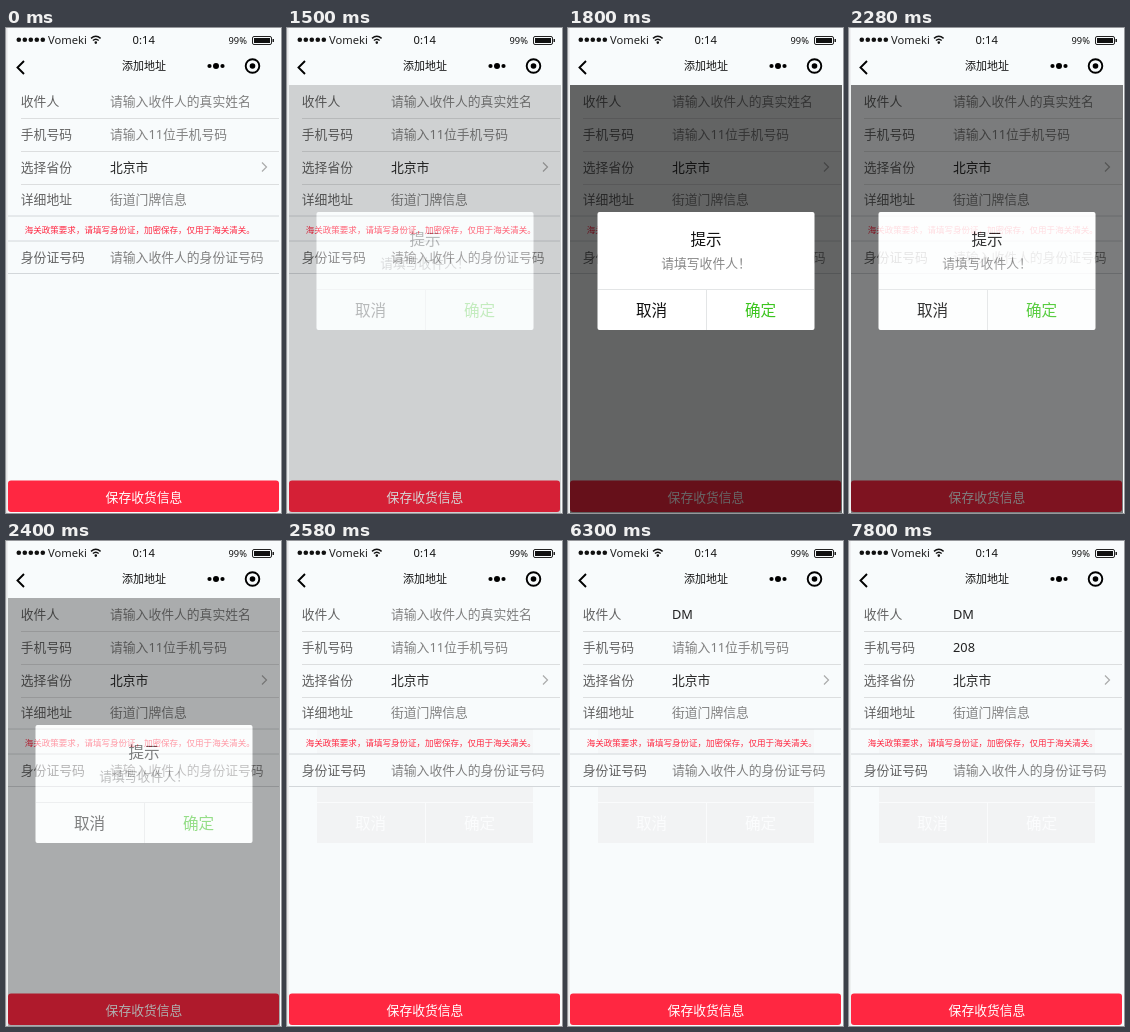
Animation, 275 px wide and 485 px high, one loop 8000 ms. Source, as an HTML page:

```html
<!DOCTYPE html>
<html lang="zh">
<head>
<meta charset="utf-8">
<title>添加地址</title>
<style>
html, body { margin: 0; width: 100%; height: 100%; overflow: hidden; background: #f8fbfc; }
svg { display: block; width: 100vw; height: 100vh; }
text { font: 12.8px "Noto Sans", "Noto Sans CJK SC", "Noto Sans CJK", sans-serif; white-space: pre; }
.mid { text-anchor: middle; }
.label { fill: #626262; }
.hint { fill: #808080; }
.value { fill: #222; }
.big { font-size: 15.6px; }
.typed { font: bold 15.6px "Liberation Sans", Arial, sans-serif; fill: #1c62c8; }
.pick { font: 15.6px "Noto Sans Mono CJK SC", "Noto Sans CJK SC", monospace; fill: #1478d2; }
.line { fill: none; stroke: #dcdedf; }
</style>
</head>
<body>
<svg viewBox="0 0 275 485" preserveAspectRatio="none">
  <rect width="275" height="485" fill="#f8fbfc"/>
  <rect width="1.5" height="485" fill="#e3e4e5"/>

  <!-- status bar -->
  <g id="signal"></g>
  <text x="42" y="15.5" style="font-size:11.2px" fill="#222">Vomeki</text>
  <g fill="none" stroke="#111" stroke-width="1.4">
    <path d="M85 10.4Q89.8 6.2 94.6 10.4M86.9 12.6Q89.8 10 92.7 12.6"/>
    <circle cx="89.8" cy="14.6" r=".6"/>
  </g>
  <text class="mid" x="137.7" y="15.5" style="font-size:11.2px" fill="#111">0:14</text>
  <text x="222.5" y="15.5" style="font-size:9.3px" fill="#111">99%</text>
  <rect x="246.5" y="8.5" width="19" height="8" rx="1.5" fill="none" stroke="#222"/>
  <rect x="248" y="10" width="16" height="5" fill="#111"/>
  <rect x="266.5" y="11" width="1.5" height="3" fill="#222"/>

  <!-- title bar -->
  <path d="M18 33L11.5 39.5L18 46" fill="none" stroke="#000" stroke-width="1.9"/>
  <text class="mid" x="138" y="42" style="font-size:11px" fill="#111">添加地址</text>
  <circle cx="203.5" cy="38" r="2.1"/>
  <circle cx="210" cy="38" r="3"/>
  <circle cx="216.5" cy="38" r="2.1"/>
  <circle cx="246.5" cy="38" r="6.8" fill="none" stroke="#000" stroke-width="1.9"/>
  <circle cx="246.5" cy="38" r="2.8"/>

  <!-- afterimage of the dialog -->
  <g id="trace" fill="#fbfcfd">
    <rect x="30" y="188" width="216" height="25" fill="#f5f7f8"/>
    <rect x="30" y="246" width="216" height="56" fill="#f2f3f4"/>
    <path d="M30 261.5H246M138.5 262V302" stroke="#fafbfc"/>
    <text class="mid big" x="83.5" y="288">取消</text>
    <text class="mid big" x="192.5" y="288">确定</text>
  </g>

  <!-- form -->
  <path class="line" d="M15 90.5H273M15 123.5H273M15 156.5H273"/>
  <path class="line" d="M2 188H273M2 213H273M2 245.5H273" style="stroke:#d3d7da"/>
  <g id="rows"></g>
  <text id="name" class="value" x="104" y="78">DM</text>
  <text id="phone" class="value" x="104" y="111"></text>
  <path d="M256 134.5L260.5 139L256 143.5" fill="none" stroke="#aaa" stroke-width="1.2"/>
  <text x="18.8" y="205.3" style="font-size:8.53px" fill="#ff2741">海关政策要求，请填写身份证，加密保存，仅用于海关清关。</text>
  <rect x="2" y="452.5" width="271" height="31.5" rx="3" fill="#ff2741"/>
  <text class="mid" x="138" y="473.7" fill="#fff">保存收货信息</text>

  <path id="caret" stroke="#222" fill="none"/>

  <!-- input method window -->
  <g id="ime">
    <rect x="127.5" y="91.5" width="150" height="58" fill="#fcfdfe" stroke="#b9bcc0"/>
    <path d="M128 120.5H275" stroke="#e4e7ea"/>
    <text id="typed" class="typed" x="137.3" y="111"></text>
    <path id="bar" stroke="#e02020" stroke-width="1.2"/>
    <text id="pick0" class="pick" x="137.5" y="140" style="fill:#d81414"></text>
    <text id="pick1" class="pick" x="179.5" y="140"></text>
    <text id="pick2" class="pick" x="229.5" y="140"></text>
  </g>

  <!-- dialog -->
  <g id="dialog">
    <rect x="2" y="57" width="272" height="428" fill="#000" fill-opacity=".6"/>
    <rect x="29.5" y="184" width="217" height="118" rx="2" fill="#fff"/>
    <path class="line" d="M30 261.5H246M138.5 262V302" style="stroke:#e3e5e6"/>
    <text class="mid big" x="138" y="216.5" fill="#111">提示</text>
    <text class="mid" x="138" y="240.3" fill="#888">请填写收件人！</text>
    <text class="mid big" x="83.5" y="288" fill="#111">取消</text>
    <text class="mid big" x="192.5" y="288" fill="#3cc51f">确定</text>
  </g>
</svg>
<script>
const LOOP = 8000, STEP = 60;
const NS = "http://www.w3.org/2000/svg";
const $ = id => document.getElementById(id);

function add(parent, tag, attrs, content = "") {
  const el = document.createElementNS(NS, tag);
  for (const key in attrs) el.setAttribute(key, attrs[key]);
  el.textContent = content;
  parent.append(el);
  return el;
}

for (let i = 0; i < 5; i++) add($("signal"), "circle", { cx: 12.8 + i * 6, cy: 11.8, r: 2.3, fill: "#111" });

const hints = [
  [78, "收件人", "请输入收件人的真实姓名"],
  [111, "手机号码", "请输入11位手机号码"],
  [144, "选择省份", "北京市", "value"],
  [176.3, "详细地址", "街道门牌信息"],
  [234, "身份证号码", "请输入收件人的身份证号码"]
].map(([y, label, content, kind = "hint"]) => {
  add($("rows"), "text", { x: 14.8, y, class: "label" }, label);
  return add($("rows"), "text", { x: 104, y, class: kind }, content);
});

// [from, to, x, top, bottom]
const carets = [
  [3000, 3540, 104.5, 64, 81],
  [4020, 4680, 107.5, 64, 81],
  [4680, 5280, 126.5, 64, 81],
  [5820, 6300, 104.5, 97, 115],
  [6540, 6840, 111.5, 97, 115],
  [6840, 7260, 119.5, 97, 115],
  [7260, 7800, 126.5, 97, 115]
];
const digits = [[7260, "208"], [6840, "20"], [6540, "2"]];

const show = (el, on) => el.setAttribute("visibility", on ? "visible" : "hidden");

function dialogAlpha(t) {
  if (t < 1500 || t >= 2580) return 0;
  if (t < 2160) {
    const k = Math.min(6, Math.floor((t - 1500) / STEP) + 1);
    return 1 - (1 - k / 6) ** 1.75;
  }
  const k = Math.min(6, Math.floor((t - 2160) / STEP) + 1);
  return 1 - (k / 7) ** 2.2;
}

function imeAlpha(t) {
  if (t < 4020 || t >= 4800) return 0;
  if (t < 4680) return 1;
  return t < 4740 ? 0.6 : 0.25;
}

function draw(t) {
  $("dialog").setAttribute("opacity", dialogAlpha(t));
  show($("trace"), t >= 2580);

  show(hints[0], t < 4020);
  show(hints[1], t < 6540);
  show($("name"), t >= 4680);
  const typed = digits.find(([from]) => t >= from);
  $("phone").textContent = typed ? typed[1] : "";

  const caret = carets.find(([from, to]) => t >= from && t < to);
  show($("caret"), caret);
  if (caret) {
    const [from, , x, top, bottom] = caret;
    const foot = from === 4020 ? `M104 ${bottom - 0.5}H${x}` : "";
    $("caret").setAttribute("d", `M${x} ${top}V${bottom}${foot}`);
  }

  $("ime").setAttribute("opacity", imeAlpha(t));
  const both = t >= 4440;
  $("typed").textContent = both ? "DM" : "D";
  $("bar").setAttribute("d", `M${both ? 162.5 : 149.5} 96V115`);
  const picks = both ? ["1.DM", "2.DMB", "3.DMZ"] : t >= 4140 ? ["1.的", "2.到", "3.大"] : ["", "", ""];
  picks.forEach((word, i) => $("pick" + i).textContent = word);
}

const start = performance.now();
function tick() {
  draw((performance.now() - start) % LOOP);
  requestAnimationFrame(tick);
}
tick();
</script>
</body>
</html>
```
